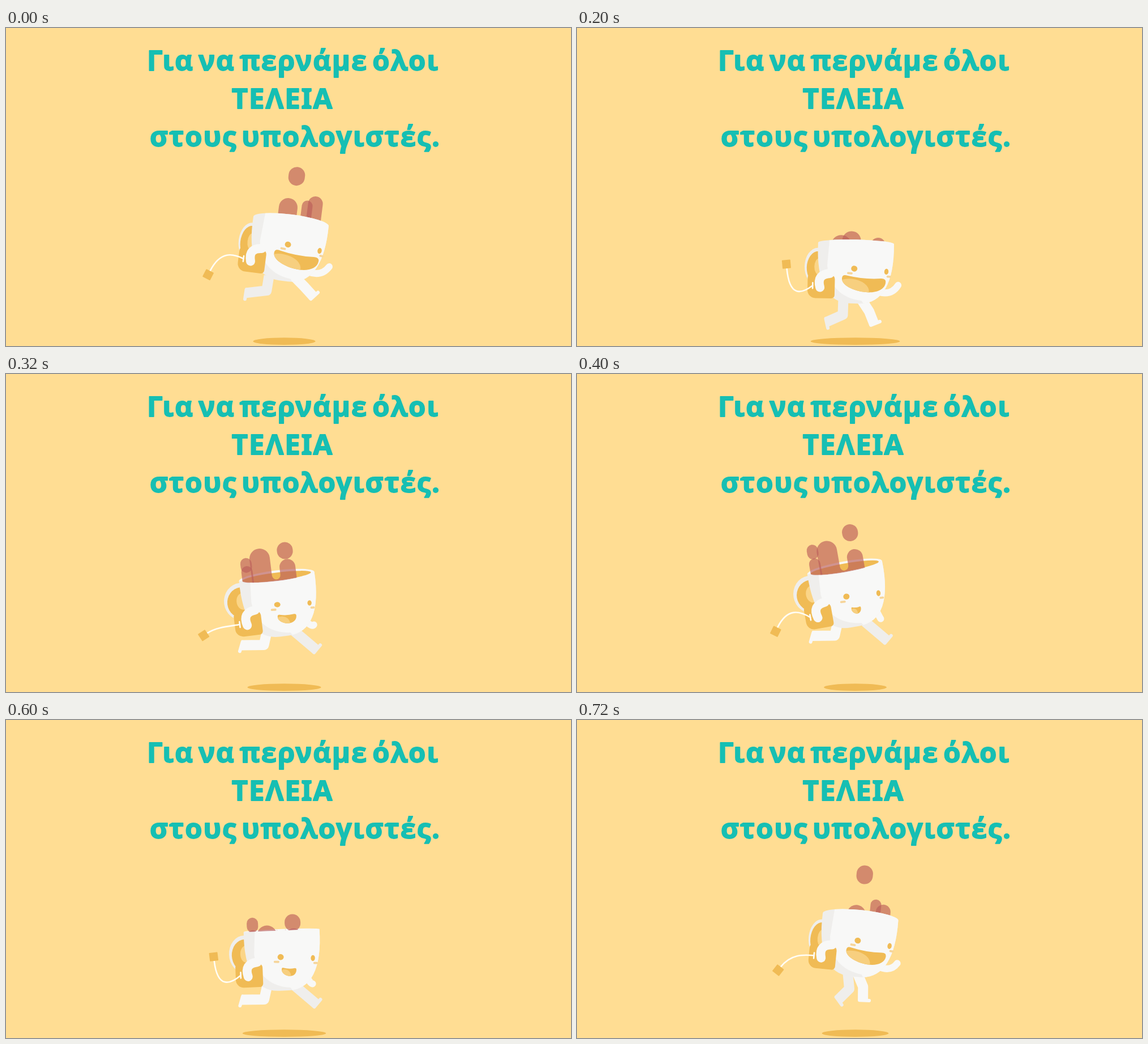
These frames come from a looping animation (998 by 561 pixels, 0.76 s). An HTML page with a canvas:

```html
<!DOCTYPE html>
<html lang="el">
<head>
<meta charset="utf-8">
<title>Running cup</title>
<style>
  html, body { margin: 0; width: 100%; height: 100%; overflow: hidden; background: #ffdd93; }
  canvas, svg { position: absolute; left: 0; top: 0; width: 998px; height: 561px; }
  text {
    font: 800 49px "Noto Sans", "Open Sans", sans-serif;
    letter-spacing: 1.9px;
    word-spacing: -6.5px;
    text-anchor: middle;
    fill: #16bfb3;
    stroke: #16bfb3;
    stroke-width: 1.8px;
    stroke-linejoin: round;
  }
</style>
</head>
<body>
<canvas id="stage" width="998" height="561"></canvas>
<svg viewBox="0 0 998 561">
  <text x="507" y="75">Για να περνάμε όλοι</text>
  <text x="488.5" y="142">ΤΕΛΕΙΑ</text>
  <text x="511" y="209">στους υπολογιστές.</text>
</svg>
<script>
const ctx = document.getElementById('stage').getContext('2d');
const LOOP = 760, STEP = 40;
const GOLD = '#f0bb55', WHITE = '#f8f8f7', GREY = '#efeeec', CORD = '#fffdf6';
const TEA = 'rgba(188,95,90,.65)', BLUSH = '#f6d59a';
const { PI, sin, cos, abs, max, min } = Math;

const clamp = (v, lo, hi) => max(lo, min(hi, v));
const mix = (a, b, k) => a + (b - a) * k;

function ellipse(x, y, rx, ry, color) {
  ctx.fillStyle = color;
  ctx.beginPath();
  ctx.ellipse(x, y, max(rx, 0), max(ry, 0), 0, 0, 2 * PI);
  ctx.fill();
}

function box(x, y, w, h, r, color) {
  ctx.fillStyle = color;
  ctx.beginPath();
  ctx.roundRect(x - w / 2, y - h / 2, w, h, r);
  ctx.fill();
}

function stroke(color, width, cap, trace) {
  ctx.strokeStyle = color;
  ctx.lineWidth = width;
  ctx.lineCap = cap;
  ctx.lineJoin = 'round';
  ctx.beginPath();
  trace();
  ctx.stroke();
}

function inSpace(x, y, angle, draw) {
  ctx.save();
  ctx.translate(x, y);
  ctx.rotate(angle);
  draw();
  ctx.restore();
}

// Everything that moves follows from the angle of the loop.
function poseAt(t) {
  const turn = 2 * PI * t / LOOP;
  const lean = cos(turn - .364);
  const stride = cos(turn - .744);
  // Two hops per loop, each with a slow fall and a quick rise.
  const hop = 2 * turn - (1.57 - .38 * sin(turn)) * sin(turn) ** 2;
  const fall = (.5 - .5 * cos(hop)) ** 1.2;
  return {
    t, turn, lean, fall,
    x: 488.5 + 16 * lean,
    y: 341 + 54 * fall,
    angle: (9 * lean - 1.2) * PI / 180,
    bulge: clamp(-24 * lean, -12, 11),
    smile: clamp(.5 + .75 * stride, 0, 1),
    swing: clamp(2.2 * (stride - .325), -1, 1),
    blink: max(0, 1 - abs(t - 285) / 45)
  };
}

// swing runs from -1, stretched back, to 1, stretched forward
function drawLeg(baseX, baseY, swing, color) {
  const hipX = baseX - 5 + 24 * swing;
  const ankleX = baseX - 8 + 66 * swing;
  const ankleY = baseY + 53 - (swing > 0 ? 20 : 28) * swing ** 2;
  const kneeX = (hipX + ankleX) / 2 + 8.5 * (1 - swing);
  const kneeY = (baseY + ankleY) / 2 + 3 * (1 - swing) ** 2;
  const toe = (28 - 78 * swing) * PI / 180;
  stroke(color, 18, 'butt', () => {
    ctx.moveTo(hipX, baseY);
    ctx.lineTo(kneeX, kneeY);
    ctx.lineTo(ankleX, ankleY);
  });
  stroke(color, 6, 'round', () => {
    ctx.moveTo(ankleX - 6 * cos(toe), ankleY - 6 * sin(toe));
    ctx.lineTo(ankleX + 11 * cos(toe), ankleY + 11 * sin(toe));
  });
}

function drawRightArm(smile) {
  stroke(WHITE, 12, 'round', () => {
    ctx.moveTo(42, 85);
    ctx.quadraticCurveTo(mix(46, 66, smile), mix(98, 90, smile), mix(47, 77, smile), mix(100, 71, smile));
  });
}

function drawLeftArm() {
  stroke(WHITE, 16, 'round', () => {
    ctx.moveTo(-45, 54);
    ctx.quadraticCurveTo(-69, 56, -62, 79);
  });
}

function drawHandle(bulge) {
  const rx = 26 + .45 * bulge, cy = 40 - .35 * bulge, edge = 4.5 + .1 * bulge;
  ellipse(-67, cy, rx, 33, GREY);
  ellipse(-66, cy + 2, rx + 1 - edge, 33 - edge, GOLD);
  ellipse(-64, cy, rx * .38, 15, '#fbd587');
}

// Height of a splash that leaves the cup at `start` and lands after `life` ms.
function splashHeight(t, start, life, peak) {
  const u = ((t - start + LOOP) % LOOP) / life;
  const eased = u ** .7;
  return u < 1 ? 4 * peak * eased * (1 - eased) : 0;
}

function drawTea(t) {
  const column = (x, r, start, life, peak) => {
    const h = splashHeight(t, start, life, peak);
    if (h) ctx.roundRect(x - r, -h, 2 * r, h + 45, [r, r, 0, 0]);
    return h;
  };
  const drop = (x, rx, ry, start, life, peak) => {
    const h = splashHeight(t, start, life, peak);
    if (h) ctx.roundRect(x - rx, -h - ry, 2 * rx, 2 * ry, rx);
  };
  const fill = trace => {
    ctx.beginPath();
    trace();
    ctx.fill();
  };
  ctx.fillStyle = TEA;

  // splash while leaning forward
  fill(() => column(-8, 16.5, 705, 310, 48));
  fill(() => column(39, 13, 705, 275, 56));
  fill(() => column(25, 9.5, 680, 230, 40));
  fill(() => drop(0, 14.5, 16.5, 650, 290, 80));

  // splash while leaning back; its wide columns share a rounded gap
  fill(() => {
    column(-26, 18, 190, 440, 54);
    if (column(21, 14, 215, 400, 30)) {
      ctx.moveTo(-8, -3);
      ctx.ellipse(-.5, -3, 7.5, 8, 0, PI, 0, true);
      ctx.lineTo(7, 40);
      ctx.lineTo(-8, 40);
      ctx.closePath();
    }
  });
  fill(() => column(-51, 10, 215, 400, 26));
  fill(() => drop(20, 14, 15, 272, 358, 59));
  fill(() => drop(-51, 10, 13, 275, 370, 37));
}

function drawBowl(bulge) {
  const open = bulge > 0;
  ctx.save();
  ctx.beginPath();
  ctx.moveTo(-67, 0);
  ctx.ellipse(0, 0, open ? 62 : 67, open ? max(bulge - 3, 0) : -bulge, 0, PI, 0, open);
  ctx.lineTo(67, 0);
  ctx.bezierCurveTo(69, 70, 48, 106, 8, 106);
  ctx.lineTo(-8, 106);
  ctx.bezierCurveTo(-48, 106, -69, 70, -67, 0);
  ctx.fillStyle = GREY;
  ctx.fill();
  ctx.clip();
  ctx.fillStyle = WHITE;
  ctx.beginPath();
  ctx.moveTo(-46, -20);
  ctx.lineTo(-50, 40);
  ctx.bezierCurveTo(-46, 80, -20, 98, 12, 101);
  ctx.lineTo(25, 120);
  ctx.lineTo(90, 120);
  ctx.lineTo(90, -20);
  ctx.fill();
  ctx.restore();
}

function drawMouth(smile) {
  const w = mix(17, 80, smile), h = mix(12, 27, smile);
  ctx.save();
  ctx.translate(14 + .06 * w, 25.5);
  ctx.scale(w, h);
  ctx.beginPath();
  ctx.moveTo(-.5, -.25);
  ctx.quadraticCurveTo(-.5, -.54, -.38, -.46);
  ctx.quadraticCurveTo(0, -.3, .38, -.47);
  ctx.quadraticCurveTo(.5, -.52, .5, -.25);
  ctx.bezierCurveTo(.5, .25, .3, .53, .07, .53);
  ctx.bezierCurveTo(-.22, .53, -.5, .2, -.5, -.25);
  ctx.fillStyle = GOLD;
  ctx.fill();
  ctx.clip();
  ellipse(-.28, .48, .42, .75, '#f7cf7f');
  ctx.restore();
}

function drawFace({ lean, smile, blink }) {
  inSpace(3 * lean - 3, 46 - 5 * lean, .07, () => {
    const eye = 5.2 - 2.7 * blink;
    ellipse(0, 0, 5.5, eye, GOLD);
    ellipse(57, 0, 3.7, eye, GOLD);
    box(-7, 8.7, 10, 3.8, 1.9, BLUSH);
    box(62, 8.5, 8, 3.8, 1.9, BLUSH);
    drawMouth(smile);
  });
}

// The cord whips up and down twice per loop, its middle behind its end.
function drawTag(x, y, turn) {
  const wave = cos(2 * turn + .25);
  const sag = 2 - 15 * cos(2 * turn - .66);
  const endX = x - 52 - 7 * wave, endY = y - 5 + 27 * wave;
  const bendX = x - 41, bendY = y + 1.35 * sag;
  stroke(CORD, 2.6, 'round', () => {
    ctx.moveTo(x, y);
    ctx.bezierCurveTo(x - 20, y + sag, bendX, bendY, endX, endY);
  });
  inSpace(endX, endY, Math.atan2(endY - bendY, endX - bendX), () => box(8, 0, 15, 15, 1, GOLD));
}

function draw(t) {
  const pose = poseAt(t);
  const { x, y, angle, bulge, swing } = pose;
  const c = cos(angle), s = sin(angle);
  const toStage = (px, py) => [x + px * c - py * s, y + px * s + py * c];
  const onCup = part => inSpace(x, y, angle, part);
  const [baseX, baseY] = toStage(0, 97);

  ctx.fillStyle = '#ffdd93';
  ctx.fillRect(0, 0, 998, 561);
  ellipse(491.5, 552.7, 55 + 33 * pose.fall, 6.4, GOLD);

  drawLeg(baseX, baseY, -swing, GREY);
  drawLeg(baseX, baseY, swing, WHITE);

  onCup(() => {
    drawRightArm(pose.smile);
    drawHandle(bulge);
    if (bulge > 0) {
      ellipse(0, 0, 67, bulge, WHITE);
      ellipse(0, 0, 61, bulge - 4, GOLD);
    }
    drawTea(t);
    drawBowl(bulge);
    drawFace(pose);
    box(-60, 77, 48, 42, [6, 8, 6, 14], GOLD);
  });

  drawTag(...toStage(-75, 76), pose.turn);
  onCup(() => {
    stroke(CORD, 2.6, 'round', () => {
      ctx.moveTo(-75, 71);
      ctx.lineTo(-75, 81);
    });
    drawLeftArm();
  });
}

const start = performance.now();
function tick() {
  const elapsed = (performance.now() - start) % LOOP;
  draw(Math.floor(elapsed / STEP) * STEP);
  requestAnimationFrame(tick);
}
tick();
</script>
</body>
</html>
```
